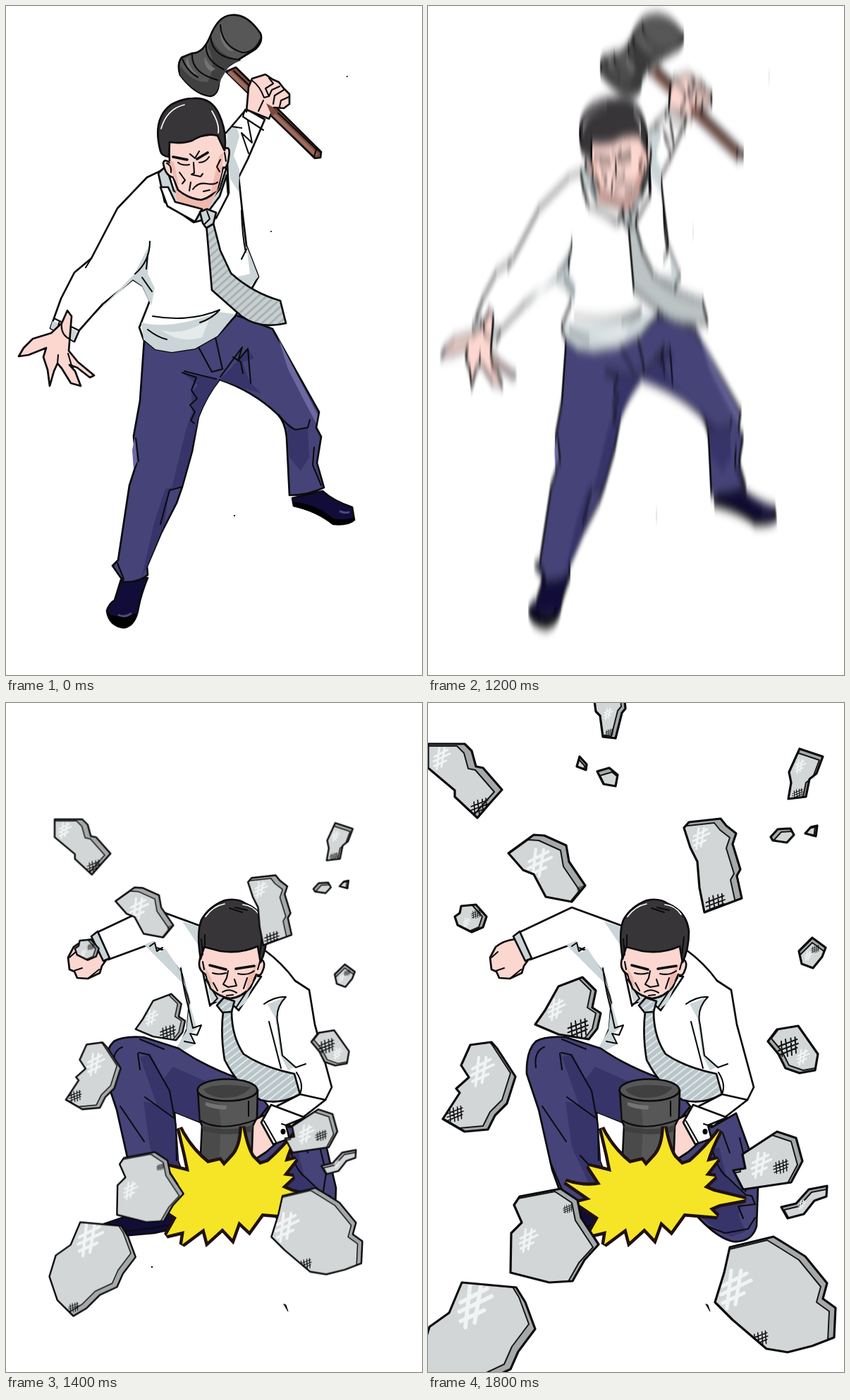
Animation of 590 by 949 pixels, one loop 2 s. Source, as an HTML page:

```html
<!DOCTYPE html>
<html lang="en">
<head>
<meta charset="utf-8">
<title>Hammer strike</title>
<style>
html, body { margin: 0; width: 100%; height: 100%; overflow: hidden; background: #fff; }
svg { display: block; width: 590px; height: 949px; }
path, ellipse { stroke-linejoin: round; stroke-linecap: round; }
.o { stroke: #0b0b0d; stroke-width: 2.7; }
.l { fill: none; stroke: #0b0b0d; stroke-width: 2.1; }
.b { stroke-width: 3.6; }
.w { fill: #fff; }
.g { fill: #cbd5d8; }
.skin { fill: #fbd7d0; }
.blush { fill: #efb9ae; }
.hair { fill: #383539; }
.navy { fill: #464378; }
.deep { fill: #37346a; }
.lit { fill: #6b69a0; }
.shoe { fill: #110d38; }
.iron { fill: #575757; }
.dark { fill: #404041; }
.pale { fill: #747475; }
.wood { fill: #7b4b40; }
.tie { fill: url(#stripes); }
.ready, .swing, .early, .mid, .late, #rocks { animation: 2s step-end infinite; }
.ready { animation-name: ready; }
.swing { animation-name: swing; }
.early { animation-name: early; }
.mid { animation-name: mid; }
.late { animation-name: late; }
#rocks { animation-name: burst; }
@keyframes ready { 0% { visibility: visible } 60%, 100% { visibility: hidden } }
@keyframes swing { 0% { visibility: hidden } 60% { visibility: visible } 65%, 100% { visibility: hidden } }
@keyframes early { 0% { visibility: hidden } 65%, 100% { visibility: visible } }
@keyframes mid { 0% { visibility: hidden } 70%, 100% { visibility: visible } }
@keyframes late { 0% { visibility: hidden } 75%, 100% { visibility: visible } }
@keyframes burst {
  0% { transform: matrix(.545, 0, 0, .54, 128, 228) }
  70% { transform: matrix(.755, 0, 0, .748, 69, 121.6) }
  75%, 100% { transform: none }
}
</style>
</head>
<body>
<svg viewBox="0 0 590 949">
<defs>
  <pattern id="stripes" width="8" height="8" patternUnits="userSpaceOnUse" patternTransform="rotate(-42)">
    <path fill="#c6cecf" d="M0 0h8v8H0z"/><path fill="#a4adaf" d="M0 0h8v2.6H0z"/>
  </pattern>
  <pattern id="stripes2" width="8" height="8" patternUnits="userSpaceOnUse" patternTransform="rotate(-38)">
    <path fill="#b9c5c9" d="M0 0h8v8H0z"/><path fill="#e2e9ea" d="M0 0h8v2H0z"/>
  </pattern>
  <filter id="blur" filterUnits="userSpaceOnUse" x="0" y="0" width="590" height="949" color-interpolation-filters="sRGB">
    <feGaussianBlur stdDeviation="0.6 7.5"/>
  </filter>
  <path id="scratch" d="M-8 2L9-7M-9 8L12-2M-8 14L7 7M-2-9L-5 18M5-9L1 15" fill="none" stroke="#f1f4f4" stroke-width="2.6"/>
  <path id="hatch" d="M-9 3L9-4M-9 7L10 0M-8 11L9 4M-6-2L-5 12M-2-4L0 12M3-5L4 11M7-6L8 9" fill="none" stroke="#111" stroke-width="1.3"/>

  <g id="strike">
    <!-- shoes and trousers -->
    <path class="o shoe" d="M163 814L201 811Q191 836 188 853Q184 879 167 882Q146 879 143 858Q146 848 154 843Z"/>
    <path d="M143 858Q150 872 186 861Q182 880 167 882Q146 879 143 858Z"/>
    <path d="M160 864Q168 868 177 862" fill="none" stroke="#4b4880" stroke-width="3"/>
    <path class="o shoe" d="M406 698L449 688Q464 702 491 711L494 729Q485 737 464 735Q440 716 408 709Z"/>
    <path d="M407 703Q442 707 464 727Q480 730 494 726Q490 737 464 736Q440 717 408 710Z"/>
    <path d="M474 717Q482 720 486 718" fill="none" stroke="#4b4880" stroke-width="3"/>
    <path class="o navy" d="M196 474L235 491L325 438L378 458L420 533L444 576L440 598L447 611L441 648L451 683Q430 694 402 694L398 612Q396 590 385 579Q350 546 303 530Q285 552 273 583L264 632L250 682L242 705L220 748L200 795L201 807Q188 818 167 817L151 794L159 786L175 680L185 649L181 610L190 560Z"/>
    <path class="deep" d="M303 530Q285 552 273 583L262 632L249 682L235 684L255 602L264 575L263 548L272 538L250 520Z"/>
    <path class="deep" d="M303 530L318 515L343 485L352 500L335 505L345 532L362 550Z"/>
    <path class="deep" d="M240 682L231 690L225 735L200 795L192 812L211 730L226 685Z"/>
    <path class="deep" d="M398 590L413 602L428 598L430 640L418 660L402 640Z"/>
    <path class="lit" d="M386 471L442 580L440 592L424 562L400 515ZM183 610L186 646L181 657L179 630Z"/>
    <path class="l" d="M273 484L292 519L307 515L297 470M250 520L270 527L263 545L271 557L261 566L268 576L262 588L267 592M253 518Q276 524 298 529M304 526L335 484L329 503L343 486L347 535M322 498L333 505L336 521M387 580Q401 598 411 601L428 598L431 587M250 682L232 687L227 705L219 735M437 626L435 651L447 680M184 613L188 646M158 790L167 813"/>
    <!-- raised arm, shirt -->
    <path class="o w" d="M217 235L200 243L158 287L121 358L97 378L78 415L63 457L97 476L104 460L137 423L180 388L194 397L204 418L189 456L195 473L212 487L235 491L268 486L300 468L325 440L349 400L358 384L341 340L335 290L330 243L343 217L367 161L341 146L313 179Z"/>
    <path class="g" d="M192 449Q235 460 301 434L325 437L300 468L268 486L235 491L212 487L195 473Z"/>
    <path class="w" d="M219 459Q248 470 288 445L278 470Q247 480 219 459Z" opacity=".5"/>
    <path class="g" d="M204 337L201 380L211 400L206 425L193 397L180 388L125 438L102 462L182 380ZM341 340L358 384L345 399L328 384L346 380ZM314 179L326 168L331 185L323 212L331 232L330 264L318 245L312 205ZM66 447L101 461L96 475L63 457Z"/>
    <path class="l" d="M204 334Q204 362 183 380M193 385L207 405M201 352L199 373M208 440Q260 449 303 431Q293 443 275 449M201 459Q215 470 228 473M68 443L103 460M76 447L72 461M89 456L86 469M339 147L336 157L365 176M343 163L349 194L334 180L344 209M320 171L334 173M341 345L334 359M121 358L113 371M334 290Q335 326 340 349"/>
    <!-- open hand -->
    <path class="o skin" d="M64 464L38 472L25 485L18 497L32 495L57 485L53 498L59 516L62 539L68 518L73 507L79 514L92 535L106 539L98 518L90 509L101 513L119 527L125 524L102 505L89 489L91 465L93 440L87 432L79 450Z"/>
    <path class="l" d="M79 450Q77 466 91 473M88 493L93 510M73 507L74 495" stroke-width="1.5"/>
    <!-- hammer -->
    <path class="o wood" d="M312 93L326 87L447 207L446 215L438 216Z"/>
    <path fill="#9d6b5d" d="M314 95L319 92L442 210L438 213Z"/>
    <path class="l" d="M323 92L441 204M437 214L440 203L447 208"/>
    <path class="o iron" d="M290 42Q301 15 318 13Q341 9 361 39Q365 51 354 61L317 84Q305 94 302 109Q301 126 290 128Q268 126 247 98Q242 83 249 73L264 67Q280 67 290 42Z"/>
    <path class="dark" d="M291 44Q300 71 334 77L317 84L303 107Q300 126 290 127Q268 125 247 98L246 83Q262 108 286 108Q300 82 286 58Z"/>
    <path class="pale" d="M305 31Q304 50 323 64L316 63Q300 50 305 31ZM258 72Q259 89 272 97L265 96Q250 83 258 72ZM282 72Q287 85 297 89L291 93Q279 85 282 72Z"/>
    <path class="l" d="M304 27Q306 57 335 66Q352 67 361 47M290 42Q292 74 331 76M284 55Q282 77 309 90M264 67Q262 95 300 105M249 73Q257 93 272 101"/>
    <path class="o skin" d="M341 150L344 115L349 103L368 97L378 104L387 108L394 117L402 125L402 139L394 145L380 144L373 160L341 147Z"/>
    <path class="wood" d="M369 138L378 143L386 151L377 156Z"/>
    <path class="l" d="M348 105Q360 113 366 130L373 128L368 117L379 110L373 102M373 128L377 119L388 114M379 139L381 127L394 119M388 143L390 134L401 129M365 134L358 149"/>
    <!-- collar, neck, tie -->
    <path class="o g" d="M216 237L227 227L238 262L278 289L303 260L314 225L316 265L297 299L266 307L225 278Z"/>
    <path class="blush" d="M237 242L243 280L284 293L304 255Z"/>
    <path class="o w" d="M230 257L240 278L278 288L268 306L229 284L219 257ZM313 240L315 268L298 301L288 290L303 270Z"/>
    <path class="o tie" d="M284 309L294 308L304 347L319 379Q350 407 389 418L397 450Q360 459 334 440L292 403Z"/>
    <path class="o g" d="M275 292L285 288L298 293L294 309L284 315L279 308Z"/>
    <path class="l" d="M285 291L289 302L282 309"/>
    <!-- head -->
    <path class="o skin" d="M231 192L299 181L309 203Q319 197 316 214Q314 232 308 229L301 257Q293 271 277 275Q260 274 244 261L237 243Q226 241 223 223Q224 216 232 222Z"/>
    <path class="blush" d="M232 220L238 221L245 254L238 244ZM302 214L308 207L306 236L299 262L290 267Z"/>
    <path class="o hair" d="M231 214Q221 213 219 206Q207 160 234 140Q250 131 265 131Q291 129 302 153Q314 179 310 205L300 184Q282 179 264 191Q249 196 232 193Z"/>
    <path d="M220 174Q228 146 253 140M292 149Q303 167 301 180" fill="none" stroke="#fff" stroke-width="1.7"/>
    <path class="l b" d="M237 214L257 218M271 217L286 208"/>
    <path class="l" d="M244 222Q250 227 260 225M274 222Q283 222 288 214M261 210L268 216L274 206M266 222L267 237L263 239L276 242L279 238M265 260Q272 250 284 252Q296 254 300 250M280 263L289 261M246 236L254 247L250 252M304 218L299 228L303 235M262 250L260 262M228 223Q235 226 234 236M310 208L312 220"/>
    <path d="M483 99h1.5v2h-1.5zM375 319h2v1.5h-2zM323 722h2v2h-2z"/>
  </g>
</defs>

<use href="#strike" class="ready"/>
<use href="#strike" class="swing" filter="url(#blur)"/>

<g class="early">
  <!-- shirt -->
  <path class="o w" d="M130 325L204 290L275 316L300 335L366 350Q392 369 410 394L430 407L438 456L462 545L453 563L400 600L330 545L244 493L257 462L260 425L249 383L224 351L202 343L145 364Z"/>
  <path class="g" d="M250 310L273 317L277 350ZM196 343L210 337L217 354L226 348L248 381L261 420L253 400ZM248 376L262 432L271 462L260 471L267 485L250 494L241 490L256 465L260 425ZM371 427L397 417Q384 432 386 451L392 500L412 515L400 521L389 499L382 447Z"/>
  <path class="l" d="M204 345L211 340L214 352L222 347M248 376Q252 407 258 429L265 461L277 457L271 471L261 469L268 483L253 480M366 427Q382 416 397 417Q380 434 386 457L392 500L411 517L425 512M373 452L390 518M412 524Q425 544 414 560M438 456L441 467"/>
  <path class="o skin" d="M123 335Q107 337 96 346L88 361L90 378L97 381L101 390L116 391L133 383L136 373L144 362Z"/>
  <path class="l" d="M96 380L108 376M116 391L132 378M90 361L99 353"/>
  <path class="o g" d="M121 331L130 324L147 362L138 366Z"/>
  <!-- legs -->
  <path class="o navy" d="M355 556L380 585L402 602L437 582L455 632L468 688L466 742Q460 765 433 764Q409 759 378 724L351 694L352 630Z"/>
  <path class="deep" d="M413 630L423 672L453 703L440 725L450 750L430 757L397 738L358 697L364 650Z"/>
  <path class="l" d="M400 617Q407 661 426 674L451 698L459 699L464 711L440 714L447 731M396 742L421 752L454 746L464 730M442 617L454 667L450 693M418 610L428 638"/>
  <path class="o shoe" d="M130 751L139 739L197 719L266 710L270 739L210 752L142 758Z"/>
  <path class="l" d="M135 750Q200 751 269 731"/>
  <path class="o navy" d="M140 526Q139 493 153 480Q166 472 195 474L245 490Q281 515 331 533L355 550L372 572L350 600L281 597L239 580L244 650L267 711L197 720L176 662L157 577Z"/>
  <path class="deep" d="M190 502L205 498L234 553L241 600L244 650L262 708L230 686L204 630L195 565L214 570ZM237 516L289 539L276 572L281 597L239 580L222 535Z"/>
  <path class="l" d="M153 517Q150 494 165 488M187 497L190 520M189 496L203 499L232 550L241 600L242 649M162 572L196 622M216 642L250 679M197 559L237 588M190 477L224 491M173 650L190 690"/>
  <!-- collar and tie -->
  <path class="o w" d="M279 381L289 428L311 418L330 436L362 388Z"/>
  <path class="g" d="M281 383L287 405L309 420L337 413L358 382L340 425L330 433L319 423L304 425L291 423Z"/>
  <path class="l" d="M283 392L300 419L289 430M354 390L327 431"/>
  <path class="o" fill="url(#stripes2)" d="M308 438L320 437Q320 473 337 498Q365 517 409 526L417 555Q388 571 361 563Q330 546 310 506Q304 470 308 438Z"/>
  <path class="o" fill="url(#stripes2)" d="M299 429L309 418L324 423L320 438L307 439Z"/>
  <!-- forearm -->
  <path class="o w" d="M417 555L453 563L404 601L380 574Z"/>
  <path class="o skin" d="M345 595L365 585L386 622L369 637L343 654Z"/>
  <path class="o w" d="M376 570L362 595L379 626L402 618L397 599L424 588Z"/>
  <path class="l" d="M391 597L397 599M366 593L383 623"/><ellipse cx="393" cy="608" rx="3.5" ry="4"/>
  <!-- hammer head -->
  <path class="o iron" d="M272 549L275 592L278 600L275 662L271 672V698Q285 711 313 711Q340 711 352 702L353 672L348 660L350 600L356 588L357 549Z"/>
  <path class="dark" d="M274 556Q288 567 302 568L305 600L299 710Q281 706 272 698L272 674L278 660L280 600L275 590Z" opacity=".55"/>
  <path class="dark" d="M272 694Q306 710 352 694L351 703Q313 717 272 698ZM278 600Q315 609 350 599L349 608Q315 616 279 607Z"/>
  <path class="pale" d="M283 566Q300 571 313 571L312 577Q293 576 283 571Z"/>
  <ellipse class="o iron" cx="314" cy="549" rx="42.5" ry="15.5"/>
  <path class="dark" d="M280 548Q302 537 347 545Q335 561 305 560Q285 557 280 548Z"/>
  <path class="l" d="M275 592Q305 610 355 591M277 661Q306 675 349 662M344 565V586"/>
  <!-- head -->
  <path class="o skin" d="M281 346L358 345L363 364Q369 369 364 380Q361 389 355 385L347 403Q334 418 318 419Q302 417 290 405L283 385Q271 378 275 363Z"/>
  <path class="blush" d="M281 372L291 390L295 407L286 392ZM357 368L349 397L341 409L343 386Z"/>
  <path class="o hair" d="M276 363Q270 326 277 308Q287 289 310 280Q328 276 341 285Q367 296 370 324Q370 349 361 368L357 345Q333 356 304 352L281 346Z"/>
  <path d="M283 303Q294 288 310 285M336 286Q350 287 359 300" fill="none" stroke="#fff" stroke-width="1.7"/>
  <path class="l" d="M317 291L335 297M325 290L342 294M277 335L279 357M282 329V344M363 332L360 358"/>
  <path class="l b" d="M289 372L312 378M326 377L352 373"/>
  <path class="l" d="M293 383Q302 386 312 383M329 384Q343 387 352 380M315 380L313 390L308 399L315 403L327 401L324 392M307 410Q316 404 327 411M294 397L300 408M342 390L337 405M313 415L322 414M279 367L281 378M360 367L357 378"/>
  <path d="M122 763h2v1.5h-2zM126 765h1.5v1.5h-1.5zM206 799h2v2h-2z"/>
</g>

<g class="mid">
  <path d="M394 853L400 863L397 854Z" stroke="#111"/>
  <path fill="#f5e526" stroke="#20110f" stroke-width="9" paint-order="stroke" style="stroke-linejoin:miter;stroke-miterlimit:2.2"
    d="M246 603Q260 632 286 653L303 649L309 657L322 643Q334 630 335 601Q341 632 349 644L360 655L372 651Q394 632 414 606Q400 633 395 651L411 647L393 670L407 672L391 687L405 693L450 704L413 711L399 717L410 728L363 724L345 749L330 735L321 760L307 745L286 764L281 745L250 768L253 749L228 755L242 730L211 709L231 704L195 679Q223 688 245 683L228 657L260 665L255 641Z"/>
</g>

<g id="rocks"></g>
</svg>
<script>
// Each stone: phase, outline, face offset, scratch spot + size, hatch spot + size.
const stones = [
  ["late", "M236-3L238 12L244 18L248 48L266 50L275 14L280 8L279-3Z", -6, -3, 255, 13, .6, 257, 40, .6],
  ["late", "M215 76L225 87L224 95L211 90Z", -3, 2],
  ["late", "M240 97L257 92L269 102L266 118L249 115Z", 4, 6],
  ["mid", "M0 58H52L62 68L68 90L78 92L105 123L88 142L70 163L38 133V124L0 92Z", -11, 3, 18, 74, 1.1, 73, 143, 1.3],
  ["mid", "M527 65L560 76L551 100L541 108L536 133L511 136L515 113L512 98Z", -5, 5, 527, 87, .7, 524, 126, .8],
  ["mid", "M486 190L496 179L514 178L519 187L509 198L489 195Z", 5, 4],
  ["mid", "M535 185L543 176L552 174L550 189Z", -3, 2],
  ["mid", "M363 177L370 169L415 164L423 174L437 185L432 200L443 236L438 245L445 277L392 297L385 262L382 225L372 205Z", -9, 6, 386, 187, 1.1, 407, 279, 1.4],
  ["mid", "M114 213L150 187L165 188L196 202L200 225L223 259L204 282L167 275L150 243L135 237Z", -8, 7, 156, 222, 1.6, 216, 262, .5],
  ["mid", "M38 303L45 298L47 288L68 286L83 303L78 318L62 325L42 315Z", -6, 0, 54, 310, .5, 68, 297, .7],
  ["mid", "M185 402L219 389L238 408L233 432L245 440L240 462L228 477L185 470L152 456L166 436Z", -7, 0, 181, 430, 1.1, 212, 457, 1.5],
  ["early", "M60 485L90 481L98 490L124 530L112 568L95 585L85 605L52 608L21 590L45 553L40 547L58 531L47 514Z", -7, -5, 75, 516, 1.5, 38, 579, 1.2],
  ["early", "M482 480L495 463L525 458L553 498L549 521L527 525L507 518L497 498Z", 5, -4, 531, 499, .8, 510, 483, 1.5],
  ["mid", "M526 352L545 333L564 347L559 360L546 376L530 370Z", 0, 7, 539, 357, .5, 549, 347, .6],
  ["early", "M446 640L495 608L522 617L531 650L515 680L447 690L433 663L450 660Z", -7, 5, 471, 650, 1.3, 500, 654, 1.1],
  ["early", "M501 715L522 710L540 690L566 685L565 700L548 706L533 725L510 731Z", 4, 4, 530, 710, .5],
  ["mid", "M130 700L188 689L212 705L217 730L242 768L222 790L205 820L172 822L117 808L118 752L133 737L122 712Z", -8, 4, 141, 757, 1.2, 198, 715, .7],
  ["early", "M48 822L125 829L138 850L152 888L128 920L117 945L85 960L60 985L35 1000L5 970L-10 925L2 885L30 865Z", -9, -7, 64, 846, 2.2, 35, 980, 1],
  ["early", "M428 772L490 757L508 768L535 785L566 823L560 845L578 858L576 900L545 912L510 921L480 916L432 875L407 850L420 808Z", -9, 5, 434, 823, 2, 470, 898, 1.2]
];

const mark = (id, x, y, size) =>
  size ? `<use href="#${id}" transform="translate(${x} ${y}) scale(${size})"/>` : "";

document.getElementById("rocks").innerHTML = stones.map(
  ([phase, d, dx, dy, sx, sy, ss, hx, hy, hs], i) => `<g class="${phase}">
    <clipPath id="edge${i}"><path d="${d}"/></clipPath>
    <path d="${d}" fill="#a5a9aa"/>
    <g clip-path="url(#edge${i})">
      <path d="${d}" transform="translate(${dx} ${dy})" fill="#d2d6d7" stroke="#161616" stroke-width="2"/>
      ${mark("scratch", sx, sy, ss)}${mark("hatch", hx, hy, hs)}
    </g>
    <path class="o" d="${d}" fill="none" style="stroke-width:3.2"/></g>`).join("");
</script>
</body>
</html>
```
